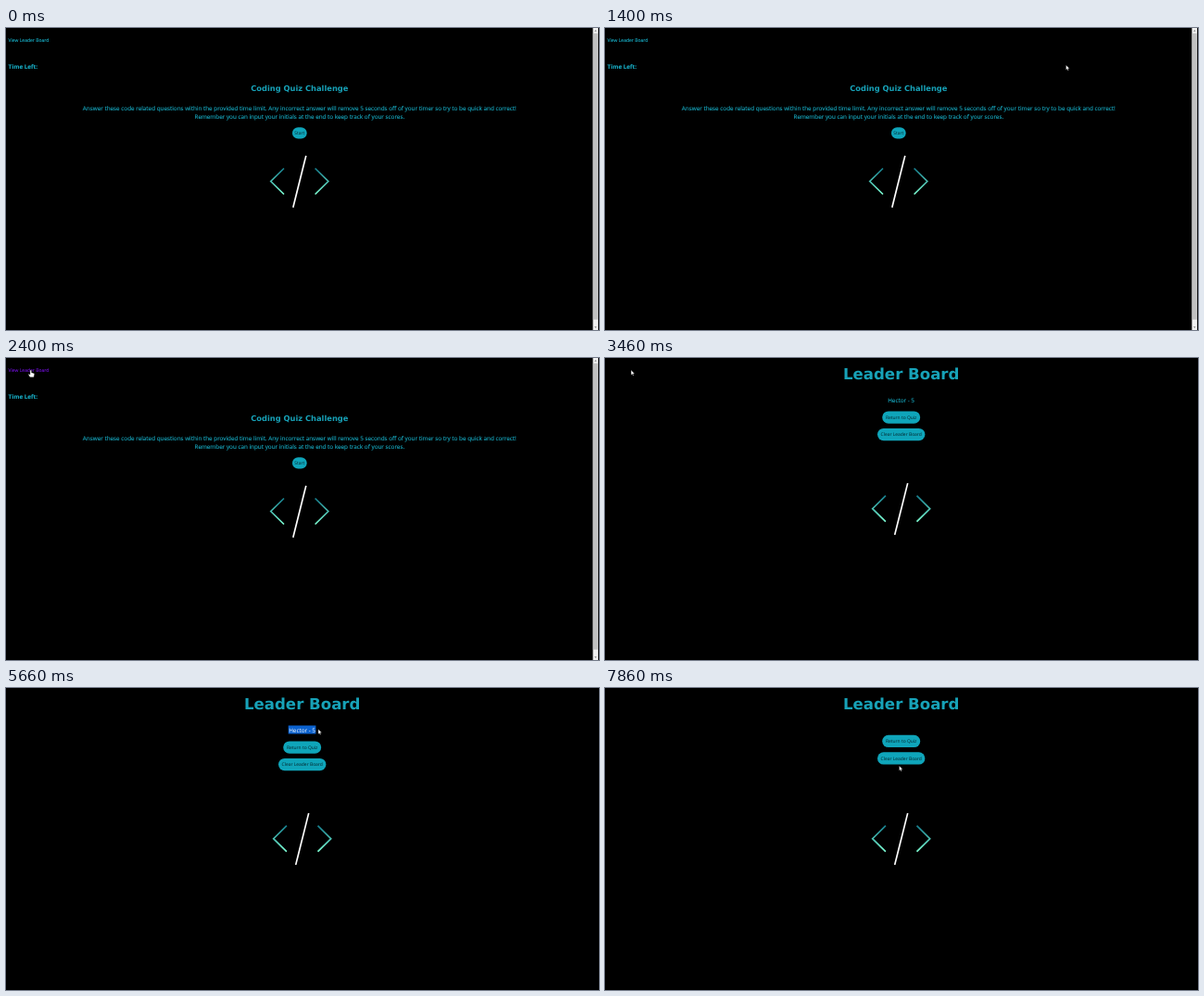
An HTML page that plays this animation: 640x326 px, repeating every 8 s.

```html
<!DOCTYPE html>
<html lang="en">
<head>
<meta charset="utf-8">
<title>Coding Quiz Challenge</title>
<style>
html, body { margin: 0; width: 100%; height: 100%; overflow: hidden; background: #000; }
svg { display: block; width: 640px; height: 326px; }
text { font-family: "Open Sans", "Noto Sans", sans-serif; font-size: 6.33px; fill: #18acc4; stroke: #18acc4; stroke-width: .12; text-rendering: geometricPrecision; }
.mid { text-anchor: middle; }
.small { font-size: 5.03px; }
.bold { font-weight: 700; }
.head { font-family: "DejaVu Sans", Verdana, sans-serif; font-weight: 700; text-anchor: middle; fill: #17a2b8; stroke: none; }
.title { font-size: 8.3px; }
.banner { font-size: 16.6px; }
.pill { fill: #0fa5ba; }
.on-pill { font-size: 4.95px; fill: #04242a; stroke: none; text-anchor: middle; }
.marked { fill: #fff; stroke: none; }
.visited { fill: #6a10cc; stroke: #6a10cc; }
.pointer { fill: #fff; stroke: #000; stroke-width: .3; }
</style>
</head>
<body>
<svg viewBox="0 0 640 326">
  <defs>
    <linearGradient id="teal" gradientUnits="userSpaceOnUse" x1="0" y1="-14" x2="0" y2="14">
      <stop offset="0" stop-color="#17808f"/>
      <stop offset="1" stop-color="#7fffd4"/>
    </linearGradient>
    <clipPath id="selected"><rect id="selectionClip" x="304.7" y="40.5" width="0" height="9"/></clipPath>
    <g id="logo" fill="none" stroke-width="1.7">
      <path stroke="url(#teal)" d="M-16.8-14.4-31-.4l14.2 14M16.8-14.4 31-.4 16.8 13.6"/>
      <path stroke="#fff" d="M7-28-7 27.8"/>
    </g>
  </defs>
  <rect width="640" height="326"/>

  <g id="quiz">
    <text id="link" class="small" x="2.6" y="15.1">View Leader Board</text>
    <text class="bold" x="2.6" y="43.5">Time Left:</text>
    <text class="head title" x="316.8" y="68.1">Coding Quiz Challenge</text>
    <text class="mid" x="316.8" y="89">Answer these code related questions within the provided time limit. Any incorrect answer will remove 5 seconds off of your timer so try to be quick and correct!</text>
    <text class="mid" x="316.8" y="98.3">Remember you can input your initials at the end to keep track of your scores.</text>
    <rect class="pill" x="309" y="107.2" width="15.7" height="12.4" rx="6.2"/>
    <text class="on-pill" x="316.8" y="115.1">Start</text>
    <use href="#logo" x="316.8" y="165.9"/>
    <rect x="633.4" width="5.7" height="326" fill="#f1f1f1"/>
    <rect x="633.8" y="5.7" width="4.9" height="309" fill="#c1c1c1"/>
    <path fill="#505050" d="M635.1 3.6 636.3 2.2l1.2 1.4zM635.1 322.4l1.2 1.4 1.2-1.4z"/>
  </g>

  <g id="board">
    <text class="head banner" x="319.7" y="23.2">Leader Board</text>
    <g id="entry">
      <text class="mid" x="319.6" y="47.5">Hector - 5</text>
      <g clip-path="url(#selected)">
        <rect x="304" y="40" width="32" height="10" fill="#0b62cf"/>
        <text class="mid marked" x="319.6" y="47.5">Hector - 5</text>
      </g>
    </g>
    <g id="buttons">
      <rect class="pill" x="299.2" y="57.4" width="41" height="13.4" rx="6.7"/>
      <text class="on-pill" x="319.7" y="66">Return to Quiz</text>
      <rect class="pill" x="294" y="75.9" width="51.4" height="13.4" rx="6.7"/>
      <text class="on-pill" x="319.7" y="84.4">Clear Leader Board</text>
    </g>
    <use href="#logo" x="319.7" y="163.1"/>
  </g>

  <g id="cursor">
    <path id="arrow" class="pointer" d="M0 0V5.3L1.2 4.2 2 6 2.9 5.6 2.1 3.8H3.8Z"/>
    <path id="hand" class="pointer" transform="scale(1.15)" d="M-.7.5Q0-.4.7.5V2.4L2.9 3Q3.5 3.2 3.4 4L2.8 6.8H-.8L-2.3 4.4Q-2.4 3.4-1.5 3.7L-.7 4.4Z"/>
  </g>
</svg>
<script>
const LOOP = 8000, STEP = 200 / 3;
const OPEN_BOARD = 3130, CLEAR_BOARD = 7530;
const $ = id => document.getElementById(id);

// Cursor path: time, x, y
const path = [
  [60, 631, 120], [530, 520, 45], [730, 520, 45], [1400, 497.5, 40], [1600, 445, 38],
  [2000, 170, 24], [2300, 35, 14], [2400, 26.8, 13], [3460, 26.8, 13], [3800, 95, 18],
  [4260, 225, 31], [4460, 275, 36], [4600, 303, 43], [4800, 303, 43], [5000, 304.5, 44.5],
  [5500, 335, 44.5], [5660, 337, 44.5], [6000, 337, 44.5], [6600, 324, 74.5],
  [7000, 317.5, 79], [7800, 317.5, 79], [7860, 317.5, 84]
];

function cursorAt(t) {
  const i = path.findIndex(p => p[0] > t);
  if (i < 0) return path[path.length - 1].slice(1);
  if (i === 0) return path[0].slice(1);
  const [a, b] = [path[i - 1], path[i]];
  const k = (t - a[0]) / (b[0] - a[0]);
  return [a[1] + (b[1] - a[1]) * k, a[2] + (b[2] - a[2]) * k];
}

const show = (id, on) => $(id).setAttribute("display", on ? "inline" : "none");

function render(time) {
  const t = Math.floor((time + 7) / STEP) * STEP;
  const [x, y] = cursorAt(t);
  const onBoard = time >= OPEN_BOARD;
  const cleared = time >= CLEAR_BOARD;
  const hover = !onBoard && x < 47 && y < 17;
  const selecting = time >= 4800 && time < 6000;

  show("quiz", !onBoard);
  show("board", onBoard);
  show("entry", !cleared);
  $("buttons").setAttribute("transform", `translate(0 ${cleared ? -6.7 : 0})`);
  $("link").classList.toggle("visited", hover);
  $("selectionClip").setAttribute("width", selecting ? Math.max(0, Math.min(29.7, x - 304.7)) : 0);

  show("cursor", time >= 60);
  show("arrow", !hover);
  show("hand", hover);
  $("cursor").setAttribute("transform", `translate(${x} ${y})`);
}

function tick() {
  render(performance.now() % LOOP);
  requestAnimationFrame(tick);
}
tick();
</script>
</body>
</html>
```
